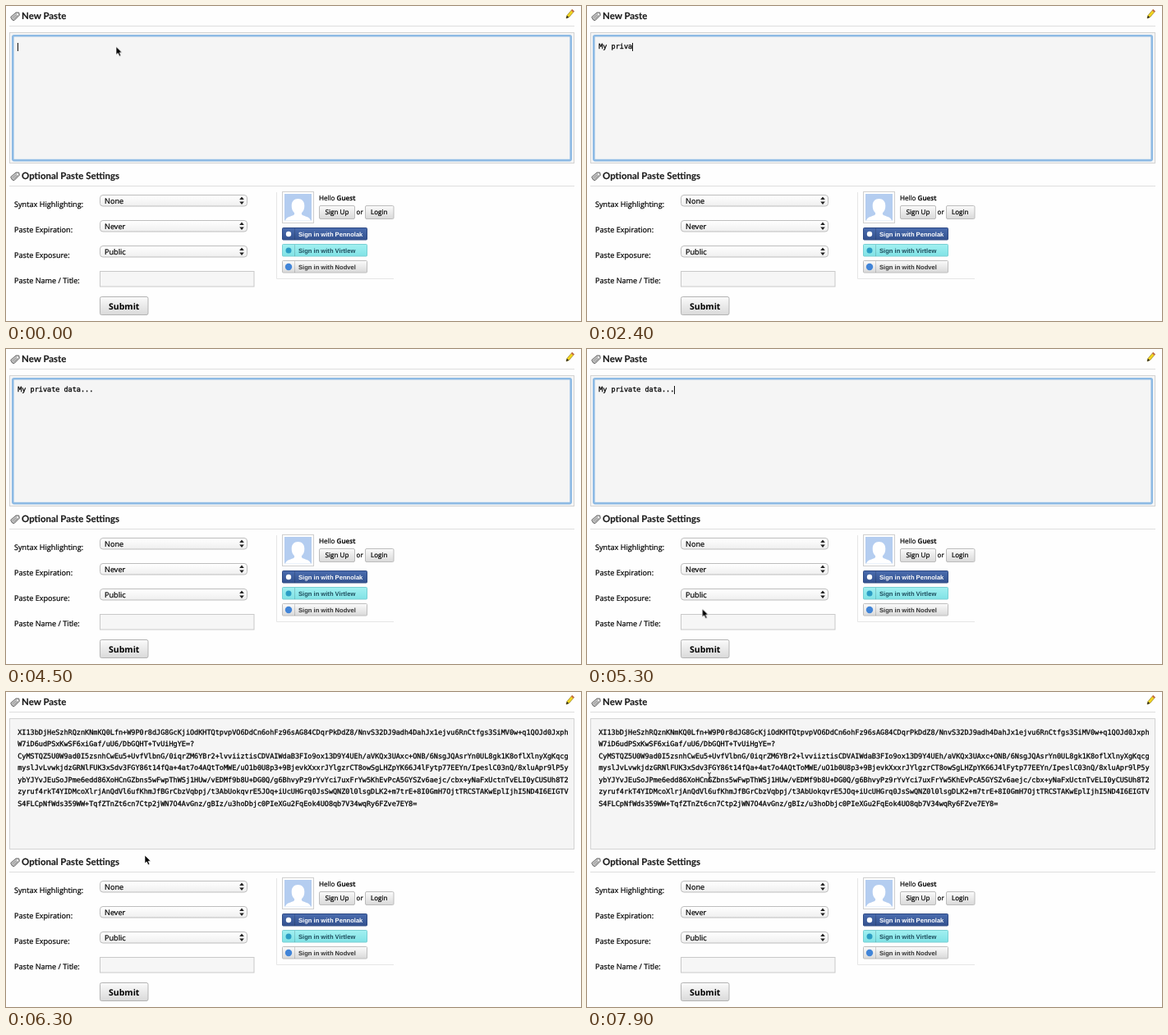
These frames come from a looping animation (700 px wide and 384 px high, 8 s). An HTML page:

```html
<!DOCTYPE html>
<html lang="en">
<head>
<meta charset="utf-8">
<title>New Paste</title>
<style>
html, body { margin: 0; width: 100%; height: 100%; overflow: hidden; background: #fefefe; }
body { position: relative; text-rendering: geometricPrecision; }
svg { position: absolute; left: 0; top: 0; }
text {
  font: 9.15px "Open Sans", "Noto Sans", sans-serif;
  fill: #000; stroke: #000; stroke-width: .22px;
}
.heading { font: 700 11.45px Lato, "Open Sans", sans-serif; fill: #1c1c1c; stroke-width: .12px; }
.small { font-size: 8.1px; }
.strong { font-weight: 600; }
.submit { font-size: 10.5px; font-weight: 700; stroke: none; }
.social text { font: 700 7.58px "Liberation Sans", Arial, sans-serif; stroke: none; }
.mono {
  position: absolute; left: 14.2px; margin: 0; white-space: pre; color: #000;
  font: 8.5px/14.45px "DejaVu Sans Mono", monospace;
  -webkit-text-stroke: .28px #000;
}
.typed {
  top: 44.6px; height: 10px; line-height: 10px; overflow: hidden;
  border-right: 1px solid #111;
}
.cipher { top: 43px; visibility: hidden; }

/* Hard switches start slightly early so they are settled on each tick. */
.typed, .focus, .cipher, .arrow, .beam {
  animation: 8s step-end -20ms infinite;
}
.typed { animation-name: type, blink, before; }
.focus { animation-name: before; }
.cipher { animation-name: after; }
.arrow { animation-name: arrow; }
.beam { animation-name: beam; }
.pointer { animation: move 8s ease-in-out -20ms infinite; }

@keyframes type {
  0% { width: 0; }
  12.5% { width: 1ch; } 13.75% { width: 2ch; } 15% { width: 3ch; }
  21.25% { width: 4ch; } 25% { width: 5ch; } 26.25% { width: 6ch; }
  27.5% { width: 7ch; } 30% { width: 8ch; } 31.25% { width: 9ch; }
  33.75% { width: 10ch; } 36.25% { width: 11ch; } 38.75% { width: 12ch; }
  40% { width: 13ch; } 41.25% { width: 14ch; } 42.5% { width: 15ch; }
  43.75% { width: 16ch; } 47.5% { width: 17ch; } 48.75%, 100% { width: 18ch; }
}
@keyframes blink {
  0%, 11.25%, 61.25%, 73.75% { border-color: #111; }
  5%, 55%, 67.5% { border-color: transparent; }
}
@keyframes before { 0% { visibility: visible; } 78.75%, 100% { visibility: hidden; } }
@keyframes after { 0% { visibility: hidden; } 78.75%, 100% { visibility: visible; } }
@keyframes arrow {
  0%, 63.5% { visibility: visible; }
  12.5%, 84.5%, 100% { visibility: hidden; }
}
@keyframes beam {
  0%, 63.5% { visibility: hidden; }
  60%, 84.5%, 100% { visibility: visible; }
}
@keyframes move {
  0%, 59% { transform: translate(134px, 49.5px); animation-timing-function: ease-in; }
  63.75% { transform: translate(172px, 203px); animation-timing-function: linear; }
  66.25% { transform: translate(140px, 309px); animation-timing-function: ease-out; }
  68.75% { transform: translate(142px, 355px); }
  70% { transform: translate(145px, 345px); }
  76.5%, 82% { transform: translate(169px, 199px); }
  91.5%, 100% { transform: translate(149px, 104px); }
}
</style>
</head>
<body>
<svg width="700" height="384" viewBox="0 0 700 384">
  <defs>
    <linearGradient id="button" x2="0" y2="1">
      <stop stop-color="#fbfbfb"/><stop offset="1" stop-color="#d9d9d9"/>
    </linearGradient>
    <linearGradient id="field" x2="0" y2="1">
      <stop stop-color="#fff"/><stop offset="1" stop-color="#efefef"/>
    </linearGradient>
    <linearGradient id="blue" x2="0" y2="1">
      <stop stop-color="#4a6cae"/><stop offset="1" stop-color="#34528f"/>
    </linearGradient>
    <linearGradient id="aqua" x2="0" y2="1">
      <stop stop-color="#a2f0f1"/><stop offset="1" stop-color="#80e2e5"/>
    </linearGradient>
    <g id="tag" stroke-linejoin="round">
      <path d="M.7 6.5 7 1h3.700l.6 3.200L5 10.600 2.600 10z" fill="#c9c9c9" stroke="#626262"/>
      <path d="M2.800 7.600 7.600 3.300M4.400 9 9 4.700" stroke="#7d7d7d" stroke-width=".8"/>
      <circle cx="9.200" cy="2.900" r=".9" fill="#fff"/>
    </g>
    <g id="select">
      <rect x=".5" y=".5" width="179" height="13.500" rx="3.500" fill="url(#field)" stroke="#bdbdbd"/>
      <path d="M170.200 6 173 2.600 175.800 6zM170.200 8.500 173 11.900 175.800 8.500z" fill="#222"/>
    </g>
  </defs>

  <use href="#tag" x="5" y="7"/>
  <text class="heading" x="19" y="16">New Paste</text>
  <path d="M4 24.500H692M4 219.500H692" stroke="#dedede"/>
  <g>
    <path d="m682 15 1-3.600 6-7 2.500 2.200-6 7z" fill="#f3d51f" stroke="#8d7a1b" stroke-width=".7"/>
    <path d="m682 15 .9-3.200 2.300 2z" fill="#222"/>
    <path d="m688 5.500 1.200-1.400 2.500 2.200-1.200 1.400z" fill="#c5664a"/>
  </g>

  <rect x="4.500" y="32.500" width="687" height="159" fill="#f5f5f5" stroke="#d3d3d3"/>
  <rect class="focus" x="8.300" y="36.300" width="679.400" height="151.800" rx="1.500" fill="#f5f5f5" stroke="#8dbae4" stroke-width="2.600"/>

  <use href="#tag" x="5" y="202"/>
  <text class="heading" x="19" y="210.500">Optional Paste Settings</text>

  <text x="10" y="245">Syntax Highlighting:</text>
  <text x="10" y="276">Paste Expiration:</text>
  <text x="10" y="307">Paste Exposure:</text>
  <text x="10" y="338">Paste Name / Title:</text>

  <use href="#select" x="114" y="230"/>
  <use href="#select" x="114" y="261"/>
  <use href="#select" x="114" y="292"/>
  <text x="120" y="240.500">None</text>
  <text x="120" y="271.500">Never</text>
  <text x="120" y="302.500">Public</text>
  <rect x="114.500" y="323.500" width="187.500" height="18.500" fill="#f6f6f6" stroke="#c9c9c9"/>
  <rect x="114.500" y="354.500" width="58.500" height="22" rx="2" fill="url(#button)" stroke="#b3b3b3"/>
  <text class="submit" x="125" y="369.500">Submit</text>

  <path d="M329.500 227V332.500H472" fill="none" stroke="#e6e6e6"/>
  <rect x="336.500" y="226.500" width="38" height="38" fill="#fff" stroke="#cfcfcf"/>
  <rect x="339" y="229" width="33" height="32.500" fill="#b4cdf0"/>
  <path d="M340 261.500c1-4 5-4.500 9.500-6.300 2-.8 2-2.300 1-3.700-2-2-2.800-4.500-2.800-8 0-5.500 3-8.500 7.800-8.500s7.800 3 7.800 8.500c0 3.500-.8 6-2.800 8-1 1.400-1 2.900 1 3.700 4.500 1.800 8.500 2.300 9.500 6.300z" fill="#fff"/>

  <text class="small" x="381" y="237">Hello <tspan class="strong">Guest</tspan></text>
  <g fill="url(#button)" stroke="#bcbcbc">
    <rect x="381.500" y="243.500" width="43" height="16" rx="1.500"/>
    <rect x="437.500" y="243.500" width="34.500" height="16" rx="1.500"/>
  </g>
  <text class="small" x="388.500" y="254.300">Sign Up</text>
  <text class="small" x="426.500" y="254.300">or</text>
  <text class="small" x="444" y="254.300">Login</text>

  <g class="social">
    <rect x="336.500" y="270.500" width="103" height="14.500" rx="1" fill="url(#blue)" stroke="#2f4a84"/>
    <rect x="336.500" y="290.500" width="103" height="14.500" rx="1" fill="url(#aqua)" stroke="#79cfd3"/>
    <rect x="336.500" y="310.500" width="103" height="14.500" rx="1" fill="url(#button)" stroke="#bebebe"/>
    <path d="M351.500 271V285M351.500 291V305M351.500 311V325" stroke="#000" stroke-opacity=".15"/>
    <circle cx="344" cy="278" r="3.200" fill="#fff"/>
    <circle cx="344" cy="298" r="3.500" fill="#2b9dc4"/>
    <circle cx="344" cy="318" r="4.200" fill="#4285d8"/>
    <text x="356" y="280.500" style="fill:#fff">Sign in with Pennolak</text>
    <text x="356" y="300.500" style="fill:#1d4c5c">Sign in with Virtlew</text>
    <text x="356" y="320.500" style="fill:#333">Sign in with Nodvel</text>
  </g>
</svg>

<div class="mono typed">My private data...</div>
<pre class="mono cipher">XI13bDjHeSzhRQznKNmKQ0Lfn+W9P0r8dJG8GcKjiOdKHTQtpvpVO6DdCn6ohFz96sAG84CDqrPkDdZ8/NnvS32DJ9adh4DahJx1ejvu6RnCtfgs3SiMV0w+q1QOJd0Jxph
W7iD6udPSxKwSF6xiGaf/uU6/DbGQHT+TvUiHgYE=?
CyMSTQZ5U0W9ad0I5zsnhCwEu5+UvfVlbnG/0iqrZM6YBr2+lvviiztisCDVAIWdaB3FIo9ox13D9Y4UEh/aVKQx3UAxc+ONB/6NsgJQAsrYn0UL8gk1K8oflXlnyXgKqcg
myslJvLvwkjdzGRNlFUK3xSdv3FGY86t14fQa+4at7o4AQtToMWE/uO1b0U8p3+9BjevkXxxrJYlgzrCT8owSgLHZpYK66J4lFytp77EEYn/IpeslC03nQ/8xluApr9lP5y
ybYJYvJEuSoJPme6edd86XoHCnGZbns5wFwpThWSj1HUw/vEDMf9b8U+DG0Q/g6BhvyPz9rYvYci7uxFrYw5KhEvPcA5GYSZv6aejc/cbx+yNaFxUctnTvELI0yCUSUh8T2
zyruf4rkT4YIDMcoXlrjAnQdVl6ufKhmJfBGrCbzVqbpj/t3AbUokqvrE5JOq+iUcUHGrq0JsSwQNZ0l0lsgDLK2+m7trE+8I0GmH7OjtTRCSTAKwEplIjhI5ND4I6EIGTV
S4FLCpNfWds359WW+TqfZTnZt6cn7Ctp2jWN7O4AvGnz/gBIz/u3hoDbjc0PIeXGu2FqEok4UO8qb7V34wqRy6FZve7EY8=</pre>

<svg width="700" height="384" viewBox="0 0 700 384">
  <g class="pointer">
    <path class="arrow" d="M0 0V10L2.300 7.900 4 11.800 5.900 11 4.200 7.200H7.300z" fill="#000" stroke="#fff" stroke-width=".7"/>
    <path class="beam" d="M-2-5.500Q0-5.500 0-4 0-5.500 2-5.500M0-4V4M-2 5.500Q0 5.500 0 4 0 5.500 2 5.500M-1.200 1.800H1.200" fill="none" stroke="#222" stroke-width=".9"/>
  </g>
</svg>
</body>
</html>
```
